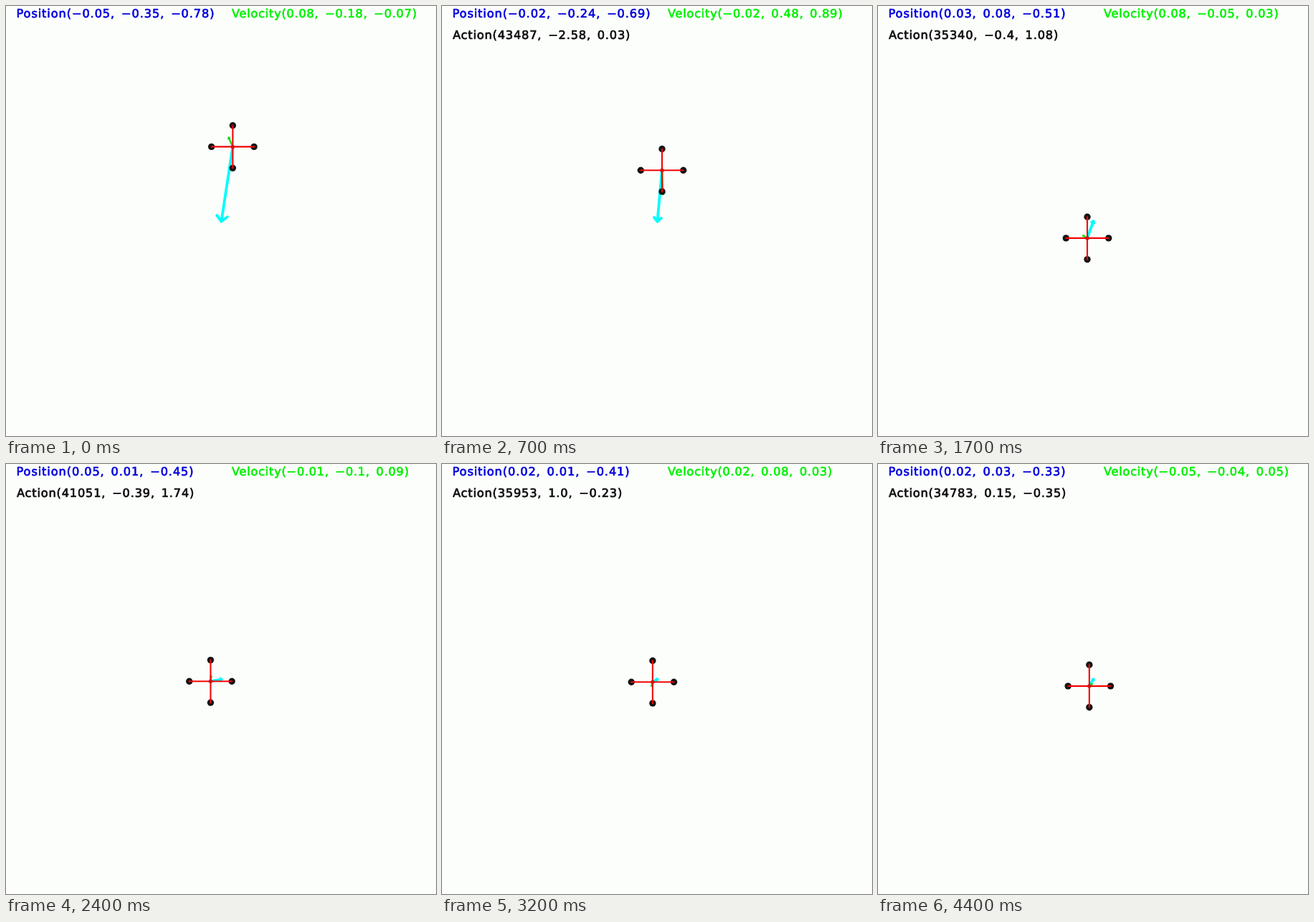
Animation of 600 by 600 pixels, one loop 4.5 s. Source, as an HTML page with a canvas:

```html
<!DOCTYPE html>
<html lang="en">
<head>
<meta charset="utf-8">
<title>Quadrotor flight</title>
<style>
html, body { margin: 0; width: 100%; height: 100%; overflow: hidden; background: #fcfefc; }
canvas { display: block; width: 600px; height: 600px; }
</style>
</head>
<body>
<canvas id="stage" width="600" height="600"></canvas>
<script>
const ctx = document.getElementById('stage').getContext('2d');
const STEP = 100, STEPS = 45;
const CELL = 600 / 640; // the scene lives on a 640 px grid
const GOAL = 300.5, SCALE = 300, ARM = 29.7, SPEED = 70;

// Waypoints: step, position, velocity (per second), action
const keys = [
  { s: 0,  p: [-0.0515, -0.347, -0.78], v: [0.08, -0.18, -0.07],   a: [38200, 0.9, 0.4] },
  { s: 7,  p: [-0.021, -0.239, -0.69],  v: [-0.02, 0.48, 0.89],    a: [43487, -2.58, 0.03] },
  { s: 17, p: [0.0295, 0.077, -0.51],   v: [0.08, -0.05, 0.03],    a: [35340, -0.4, 1.08] },
  { s: 24, p: [0.0515, 0.009, -0.45],   v: [-0.01, -0.1, 0.09],    a: [41051, -0.39, 1.74] },
  { s: 32, p: [0.0215, 0.0115, -0.41],  v: [0.02, 0.08, 0.03],     a: [35953, 1, -0.23] },
  { s: 39, p: [0.032, 0.044, -0.37],    v: [-0.003, -0.001, 0.07], a: [36534, 1.18, -0.15] },
  { s: 44, p: [0.0195, 0.032, -0.33],   v: [-0.05, -0.04, 0.05],   a: [34783, 0.15, -0.35] }
];

// Cubic Hermite flight between waypoints, with its derivative as velocity
function stateAt(step) {
  let i = 0;
  while (i < keys.length - 2 && step >= keys[i + 1].s) i++;
  const k = keys[i], n = keys[i + 1];
  const span = (n.s - k.s) * STEP / 1000;
  const u = (step - k.s) / (n.s - k.s), u2 = u * u, u3 = u2 * u;
  const pos = k.p.map((p, j) =>
    (2 * u3 - 3 * u2 + 1) * p + (3 * u2 - 2 * u3) * n.p[j] +
    ((u3 - 2 * u2 + u) * k.v[j] + (u3 - u2) * n.v[j]) * span);
  const vel = k.v.map((v, j) =>
    6 * (u - u2) * (n.p[j] - k.p[j]) / span +
    (3 * u2 - 4 * u + 1) * v + (3 * u2 - 2 * u) * n.v[j]);
  const act = k.a.map((a, j) => a + (n.a[j] - a) * u);
  return { pos, vel, act };
}

const num = x => x.toFixed(2).replace(/0$/, '').replace('-', '\u2212');
const snap = v => (Math.round(v / CELL - 0.5) + 0.5) * CELL;

function label(name, values, x, y, color, spacing) {
  ctx.fillStyle = ctx.strokeStyle = color;
  ctx.lineWidth = 0.7;
  ctx.letterSpacing = spacing + 'px';
  const text = name + '(' + values.join(', ') + ')';
  ctx.fillText(text, x, y);
  ctx.strokeText(text, x, y);
}

function line(x1, y1, x2, y2) {
  ctx.beginPath();
  ctx.moveTo(x1, y1);
  ctx.lineTo(x2, y2);
  ctx.stroke();
}

function dot(x, y, r, color) {
  ctx.fillStyle = color;
  ctx.beginPath();
  ctx.arc(x, y, r, 0, Math.PI * 2);
  ctx.fill();
}

function arrow(x1, y1, x2, y2, color, width) {
  ctx.strokeStyle = color;
  ctx.lineWidth = width;
  line(x1, y1, x2, y2);
  const tip = Math.hypot(x2 - x1, y2 - y1) * 0.1;
  const angle = Math.atan2(y1 - y2, x1 - x2);
  for (const turn of [-Math.PI / 4, Math.PI / 4]) {
    line(x2, y2, x2 + tip * Math.cos(angle + turn), y2 + tip * Math.sin(angle + turn));
  }
}

function drone(x, y) {
  for (const [dx, dy] of [[-ARM, 0], [ARM, 0], [0, -ARM], [0, ARM]]) {
    dot(x + dx, y + dy, 4.7, '#141414');
  }
  ctx.strokeStyle = '#f40404';
  ctx.lineWidth = 2.1;
  line(x - ARM, y, x + ARM, y);
  line(x, y - ARM, x, y + ARM);
  dot(x, y, 2.7, '#d41010');
}

function draw(step) {
  const { pos, vel, act } = stateAt(step);
  const x = snap(GOAL - SCALE * pos[0]), y = snap(GOAL + SCALE * pos[1]);

  ctx.fillStyle = '#fcfefc';
  ctx.fillRect(0, 0, 600, 600);
  ctx.lineCap = ctx.lineJoin = 'round';
  ctx.font = '16.2px "DejaVu Sans", sans-serif';
  ctx.textRendering = 'geometricPrecision';
  ctx.wordSpacing = '2.9px';

  arrow(x, y, GOAL, GOAL, '#00fcfc', 3.8);
  arrow(x, y, x - SPEED * vel[0], y + SPEED * vel[1], '#10e010', 2.4);
  drone(x, y);

  label('Position', pos.map(num), 14.5, 16, '#0404dc', 0.9);
  label('Velocity', vel.map(num), 315, 16, '#04f004', 0.75);
  if (step > 0) {
    label('Action', [Math.round(act[0]), num(act[1]), num(act[2])], 15, 46, '#0c0c0c', 0.82);
  }
}

function tick() {
  draw(Math.floor(performance.now() / STEP) % STEPS);
  requestAnimationFrame(tick);
}
tick();
</script>
</body>
</html>
```
